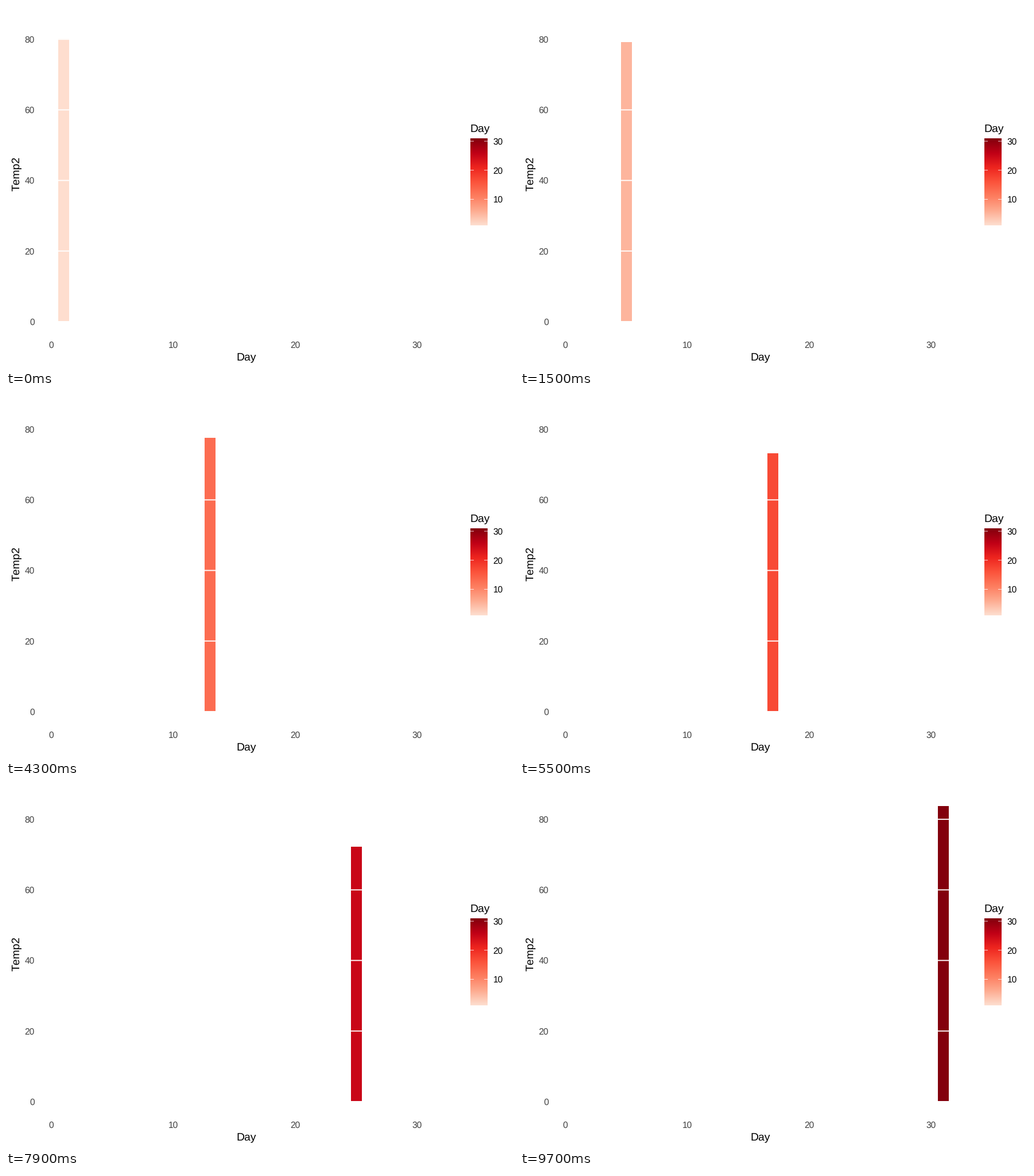
A matplotlib script for the animation above (10000 ms loop, 885 by 632 pixels).

```python
import numpy as np
import matplotlib.pyplot as plt
from matplotlib.animation import FuncAnimation
from matplotlib.colors import LinearSegmentedColormap
from matplotlib.patches import Rectangle

plt.rcParams.update({
    "font.family": "Liberation Sans",
    "text.hinting": "none",
    "text.kerning_factor": 6,  # effectively no kerning
})

W, H, DPI = 885, 632, 100
FRAMES, INTERVAL = 100, 100
PX = 72 / DPI

X0, DX = 78.9, 21.25
Y0, DY = 550.95, 6.16
TITLE, LABEL = 19.35, 15.5

# Turning points of the temperature curve: day, value
CURVE = [(1, 80.2), (5, 79.2), (11, 83.2), (13, 77.6), (17, 73.2), (20, 76.6),
         (21, 70.2), (22, 74.6), (25, 72.2), (28, 81.4), (31, 83.7)]
REDS = ["#fedecf", "#fdab90", "#fd7d5f", "#fb533b", "#ee251f", "#c00016", "#83000d"]
CMAP = LinearSegmentedColormap.from_list("reds", REDS, N=601)

fig = plt.figure(figsize=(W / DPI, H / DPI), dpi=DPI, facecolor="white")
ax = fig.add_axes([0, 0, 1, 1])
ax.axis("off")


def px(day):
    return X0 + DX * day


def py(temp):
    return Y0 - DY * temp


def text(x, y, s, size=LABEL, color="black", ha="center", **kw):
    ax.text(x, y, s, fontsize=size * PX, color=color, ha=ha, va="baseline", **kw)


def white_line(x1, x2, y, width):
    ax.plot([x1, x2], [y, y], color="white", lw=width * PX,
            solid_capstyle="butt", snap=False, zorder=3)


def draw_axes():
    for t in range(0, 81, 20):
        white_line(56, 781, py(t), 1.88)
        text(49.6, py(t) + 5.7, str(t), color="#404040", ha="right")
    for d in range(0, 31, 10):
        text(px(d), 596.6, str(d), color="#404040")
    text(419, 619, "Day", TITLE)
    text(23.8, 292.9, "Temp2", TITLE, rotation=90, rotation_mode="anchor")


def draw_legend(left=809, right=839, top=231, bottom=383):
    ramp = np.linspace(1, 0, bottom - top)[:, None]
    ax.imshow(ramp, cmap=CMAP, vmin=0, vmax=1, aspect="auto",
              extent=(left, right, bottom, top), zorder=1)
    text(left - 0.4, 220, "Day", TITLE, ha="left")
    tick = (right - left) / 5
    for d in (10, 20, 30):
        y = bottom - (bottom - top) * (d - 1) / 30
        white_line(left, left + tick, y, 0.8)
        white_line(right - tick, right, y, 0.8)
        text(848.5, y + 5.7, str(d), ha="left")


def day_at(frame):
    """Hold each day three frames; early days get a halfway step between."""
    if frame < 31:
        day, step = divmod(frame + 1, 4)
        return 1 + day + (0.5 if step == 3 else 0)
    return 9 + (frame - 31) // 3


draw_axes()
draw_legend()
ax.set_xlim(0, W)
ax.set_ylim(H, 0)
bar = ax.add_patch(Rectangle((0, Y0), 0.9 * DX, 0, lw=0, snap=True, zorder=2))


def update(frame):
    day = day_at(frame)
    bar.set_x(px(day - 0.45))
    bar.set_height(-DY * np.interp(day, *zip(*CURVE)))
    bar.set_facecolor(CMAP((day - 1) / 30))
    return (bar,)


anim = FuncAnimation(fig, update, frames=FRAMES, interval=INTERVAL,
                     repeat=True, repeat_delay=0, blit=False)
plt.show()
```
